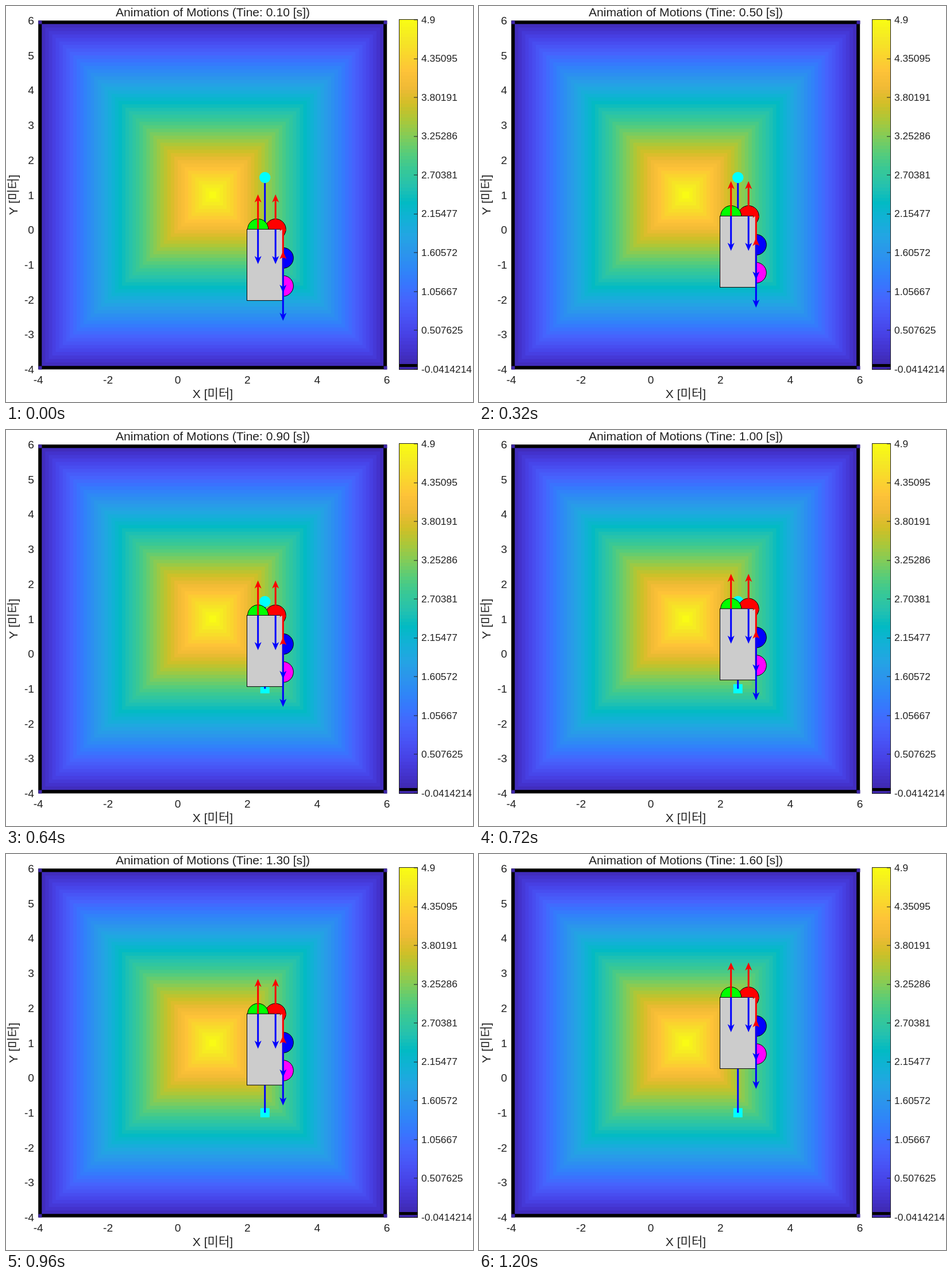
These frames come from a looping animation (813x689 px, 1280 ms). An HTML page with a canvas:

```html
<!DOCTYPE html>
<html lang="en">
<head>
<meta charset="utf-8">
<title>Animation of Motions</title>
<style>
html, body { margin: 0; width: 100%; height: 100%; overflow: hidden; background: #fff; }
canvas { display: block; }
</style>
</head>
<body>
<canvas id="stage" width="813" height="689"></canvas>
<script>
const W = 813, H = 689, UNIT = 60.7, STEP = 80, STEPS = 16;
const INK = '#212121', RED = '#f00', BLUE = '#00f', CYAN = '#0ff';
const FONT = '"Liberation Sans", Arial, "Noto Sans CJK KR", "Noto Sans CJK", sans-serif';
const px = x => 299 + UNIT * x;
const py = y => 389.5 - UNIT * y;

// Colour map stops, evenly spaced
const MAP = [
  [62, 38, 168], [67, 50, 203], [71, 65, 229], [72, 82, 244], [70, 99, 253], [56, 117, 254],
  [46, 135, 247], [43, 150, 235], [35, 165, 227], [18, 177, 214], [2, 186, 195], [36, 193, 175],
  [55, 200, 151], [87, 204, 122], [129, 204, 89], [171, 199, 57], [209, 191, 39], [240, 186, 54],
  [254, 195, 56], [250, 214, 45], [245, 233, 36], [249, 251, 21]
];

function shade(f) {
  const p = Math.min(1, Math.max(0, f)) * (MAP.length - 1);
  const i = Math.min(MAP.length - 2, Math.floor(p));
  const c = MAP[i].map((v, j) => Math.round(v + (MAP[i + 1][j] - v) * (p - i)));
  return `rgb(${c})`;
}

const LOW = -0.0414214, HIGH = 4.9;
const level = z => shade((z - LOW) / (HIGH - LOW));

function text(c, str, x, y, size, align = 'center') {
  c.font = `${size}px ${FONT}`;
  c.fillStyle = INK;
  c.textAlign = align;
  c.textBaseline = 'alphabetic';
  c.fillText(str, x, y);
}

function drawField(c) {
  for (let k = 0; k < 50; k++) {
    const r = (5 - k / 10) * UNIT;
    c.fillStyle = k ? level(k / 10) : '#000';
    c.fillRect(px(1) - r, py(1) - r, 2 * r, 2 * r);
  }
  c.fillStyle = level(LOW);
  for (const x of [56.5, 657.5])
    for (const y of [25.5, 626.5]) c.fillRect(x, y, 6, 6);
}

function drawBar(c) {
  const x = 685, top = 24, w = 31, h = 608, bands = 100;
  for (let i = 0; i < bands; i++) {
    c.fillStyle = shade(i / (bands - 1));
    const y0 = Math.round(top + h * (1 - (i + 1) / bands));
    c.fillRect(x, y0, w, Math.round(top + h * (1 - i / bands)) - y0);
  }
  c.fillStyle = '#000';
  c.fillRect(x, 623, w, 5);
  c.strokeStyle = INK;
  c.lineWidth = 1;
  c.strokeRect(x - 0.5, top - 0.5, w + 1, h + 1);
  const labels = ['4.9', '4.35095', '3.80191', '3.25286', '2.70381', '2.15477',
    '1.60572', '1.05667', '0.507625', '-0.0414214'];
  labels.forEach((s, i) => {
    const y = top + h * i / 9;
    c.fillStyle = INK;
    c.fillRect(x + w - 6, Math.round(y) - 0.5, 6, 1);
    text(c, s, 723, y + 5.7, 17.4, 'left');
  });
}

function drawAxes(c) {
  for (let x = -4; x <= 6; x += 2) text(c, x, px(x), 657, 19.2);
  for (let y = -4; y <= 6; y++) text(c, y, 49, py(y) + 6.7, 19.2, 'right');
  text(c, 'X [미터]', 360, 682, 21.1);
  c.save();
  c.translate(20, 328.5);
  c.rotate(-Math.PI / 2);
  text(c, 'Y [미터]', 0, 0, 21.1);
  c.restore();
}

function makeBackdrop() {
  const layer = document.createElement('canvas');
  layer.width = W;
  layer.height = H;
  const c = layer.getContext('2d');
  c.fillStyle = '#fff';
  c.fillRect(0, 0, W, H);
  drawField(c);
  drawBar(c);
  drawAxes(c);
  return layer;
}

const ctx = document.getElementById('stage').getContext('2d');
const backdrop = makeBackdrop();

function line(x, y0, y1, color) {
  ctx.strokeStyle = color;
  ctx.lineWidth = 3;
  ctx.beginPath();
  ctx.moveTo(x, y0);
  ctx.lineTo(x, y1);
  ctx.stroke();
}

function disc(x, y, r, color, outline) {
  ctx.beginPath();
  ctx.arc(x, y, r, 0, 2 * Math.PI);
  ctx.fillStyle = color;
  ctx.fill();
  if (!outline) return;
  ctx.strokeStyle = '#000';
  ctx.lineWidth = 1;
  ctx.stroke();
}

// Vertical arrow one unit long; dir is -1 for up, 1 for down
function arrow(x, y, dir, color) {
  const tip = y + dir * UNIT;
  line(x, y, tip - dir * 9, color);
  ctx.fillStyle = color;
  ctx.beginPath();
  ctx.moveTo(x, tip);
  ctx.lineTo(x + 6, tip - dir * 14);
  ctx.lineTo(x, tip - dir * 10);
  ctx.lineTo(x - 6, tip - dir * 14);
  ctx.fill();
}

// Travel keys: step, pixels risen, speed per step
const KEYS = [[0, 0, 2], [4, 23, 9], [6, 43.7, 11], [8, 66, 11.3], [10, 88.8, 11], [13, 120.5, 9.9], [15, 139, 8.8]];

function rise(n) {
  let i = 0;
  while (i < KEYS.length - 2 && n > KEYS[i + 1][0]) i++;
  const [t0, p0, v0] = KEYS[i], [t1, p1, v1] = KEYS[i + 1];
  const d = t1 - t0, u = (n - t0) / d, w = 1 - u;
  return p0 * w * w * (1 + 2 * u) + p1 * u * u * (3 - 2 * u) + d * u * w * (v0 * w - v1 * u);
}

function drawPath() {
  const x = px(2.5);
  ctx.fillStyle = CYAN;
  ctx.fillRect(x - 8, py(-1) - 8, 16, 16);
  line(x, py(1.5), py(-1), BLUE);
  disc(x, py(1.5), 9.7, CYAN);
}

function drawRobot(top) {
  const side = 482.3;
  const wheels = [
    [side, top + 98.7, '#f0f'],
    [side, top + 50, BLUE],
    [469.2, top, RED],
    [438.7, top, '#0f0']
  ];
  for (const [x, y, color] of wheels) disc(x, y, 18, color, true);
  ctx.fillStyle = '#ccc';
  ctx.fillRect(419.5, top, 62.5, 124);
  ctx.strokeStyle = '#000';
  ctx.lineWidth = 1;
  ctx.strokeRect(419.5, top, 62.5, 124);
  for (const [x, y] of wheels) arrow(x, y, -1, RED);
  for (const [x, y] of wheels) arrow(x, y, 1, BLUE);
}

function draw(now) {
  const n = Math.floor(now / STEP) % STEPS;
  ctx.drawImage(backdrop, 0, 0);
  text(ctx, `Animation of Motions (Tine: ${((n + 1) / 10).toFixed(2)} [s])`, 360, 17.5, 21.1);
  drawPath();
  drawRobot(388.4 - rise(n));
}

const start = performance.now();
function tick() {
  draw(performance.now() - start);
  requestAnimationFrame(tick);
}
tick();
</script>
</body>
</html>
```
